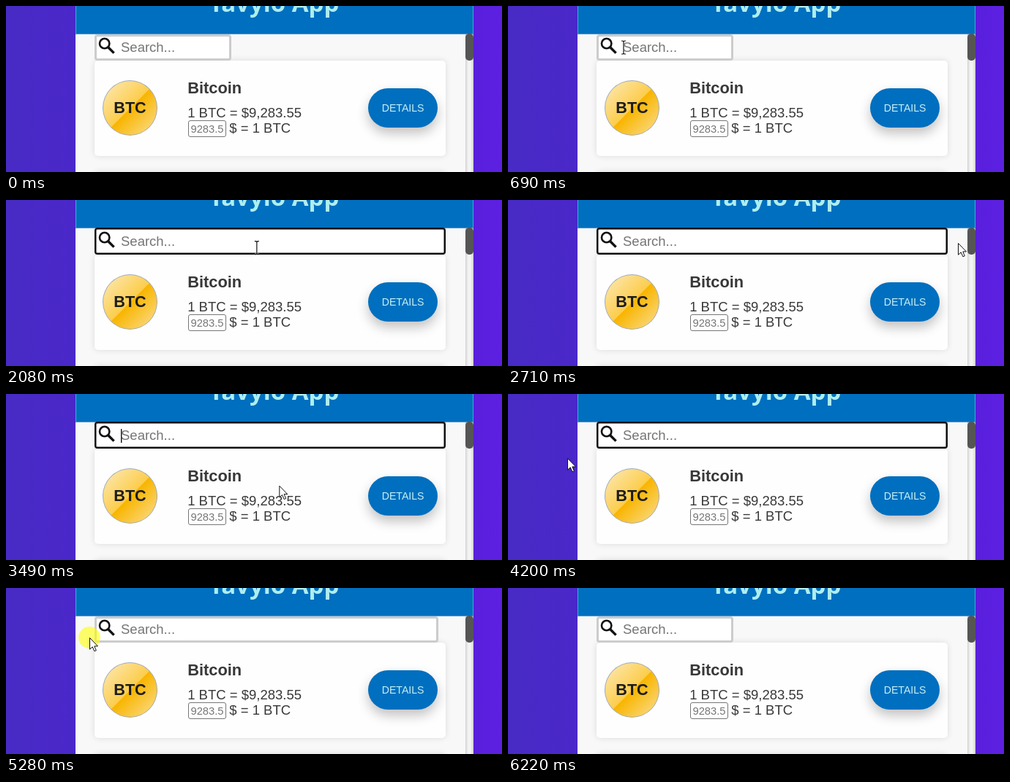
These frames come from a looping animation (678x228 px, 7.38 s). An HTML page:

```html
<!DOCTYPE html>
<html lang="en">
<head>
<meta charset="utf-8">
<title>Search field</title>
<style>
html, body { margin: 0; width: 100%; height: 100%; overflow: hidden; }
body { position: relative; background: linear-gradient(90deg, #482bc5, #4a27c9 14%, #581fdc 94%, #5d20e2); }
div, svg { position: absolute; box-sizing: border-box; }
svg { left: 0; top: 0; }
.app { left: 95px; top: 0; width: 544px; height: 228px; background: #f8f8f8; }
.header { left: 95px; top: 0; width: 544px; height: 39px; background: #006fbf; border: 0 solid #5a9fd8; border-width: 0 1px 1px; }
.track { left: 628px; top: 39px; width: 11px; height: 200px; background: #f5f5f5; box-shadow: inset 0 0 5px rgba(0,0,0,.3); }
.thumb { left: 628px; top: 38px; width: 11px; height: 37px; border-radius: 5px; background: #555; }
.card { left: 121px; width: 480px; height: 131px; border-radius: 5px; background: #fefefe; box-shadow: 0 0 8px rgba(0,0,0,.12); }
.coin { left: 132px; top: 102px; width: 75px; height: 76px; border-radius: 50%; border: 1px solid #a3abb5;
  background: linear-gradient(135deg, #fceabb, #fccd4d 50%, #f8b500 51%, #fbdf93); }
.button { left: 495px; top: 113px; width: 95px; height: 54px; border-radius: 27px; background: #006fbf; box-shadow: 0 8px 16px rgba(0,0,0,.24); }
.amount { left: 249px; top: 158px; width: 52px; height: 23px; border: 1px solid #767676; border-radius: 3px; background: #fff; }
#field { left: 121px; top: 39px; width: 187px; height: 36px; border: 3px solid #ccc; border-radius: 4px; background: #fff; }
#field.focus { top: 38px; height: 37px; border: 2px solid #101010; box-shadow: inset 0 0 0 .5px #101010; }
text { font-family: "Liberation Sans", Arial, sans-serif; font-size: 18.5px; fill: #383838; white-space: pre; }
.bold { font-weight: bold; }
.hint { fill: #757575; }
</style>
</head>
<body>
<div class="app"></div>
<div class="header"></div>
<div class="track"></div>
<div class="thumb"></div>
<div class="card" style="top:75px"></div>
<div class="card" style="top:228px"></div>
<div class="coin"></div>
<div class="button"></div>
<div class="amount" style="top:157px"></div>
<div id="field"></div>
<svg width="678" height="228" viewBox="0 0 678 228">
  <text x="366.5" y="8" text-anchor="middle" style="font:bold 33px 'Noto Sans','Open Sans',sans-serif;fill:#afeeee">Tavylo App</text>
  <g fill="none" stroke="#111">
    <circle cx="134.7" cy="51.5" r="6.7" stroke-width="2.6"/>
    <path d="M139.5 56.5L147.6 64.6" stroke-width="3.4"/>
  </g>
  <text class="hint" x="157" y="63">Search...</text>
  <text class="bold" x="169.5" y="147" text-anchor="middle" style="font-size:21.6px;fill:#1c1c1c">BTC</text>
  <text class="bold" x="248.3" y="119.6" style="font-size:21.8px">Bitcoin</text>
  <text x="248.2" y="152.7">1 BTC = $9,283.55</text>
  <text class="hint" x="252.5" y="173.8" style="font-size:14.7px">9283.5</text>
  <text x="305.3" y="174">$ = 1 BTC</text>
  <text x="542.6" y="145" text-anchor="middle" style="font-size:14.1px;fill:#c4f1f5">DETAILS</text>
  <rect id="caret" x="157" y="48" width="1.4" height="19" fill="#111"/>
  <circle id="halo" r="15" fill="#ff0" fill-opacity=".58"/>
  <path id="arrow" d="M.5 .5V16.2L4.2 12.8L6.9 18.8L9.3 17.8L6.8 11.9H11.5Z" fill="#fff" stroke="#111" stroke-linejoin="round"/>
  <g id="beam" fill="none">
    <path d="M-3 -9H-1L0 -8L1 -9H3M0 -8V8M-3 9H-1L0 8L1 9H3" stroke="#fff" stroke-width="2.4" stroke-opacity=".7"/>
    <path d="M-3 -9H-1L0 -8L1 -9H3M0 -8V8M-3 9H-1L0 8L1 9H3" stroke="#111" stroke-width="1.2"/>
  </g>
</svg>
<script>
const LOOP = 7380, STEP = LOOP / 95, LEAD = 12;
const NARROW = 187, WIDE = 480, GROW = 400;
const FOCUS = 1085, BLUR = 5262, BLINK = 530, FLASH = 240;
const ENTER = 70, LEAVE = 6200;

// pointer stops: time, x, y
const stops = [
  [70, 499, 210], [690, 158, 57], [1780, 158, 58], [2310, 589, 76], [2710, 615, 59],
  [3180, 611, 75], [3600, 330, 135], [4200, 81, 88], [4810, 114, 68], [5900, 114, 68], [6160, 660, 215]
];

const $ = id => document.getElementById(id);
const [field, caret, halo, arrow, beam] = ["field", "caret", "halo", "arrow", "beam"].map($);
const show = (el, on) => { el.style.visibility = on ? "visible" : "hidden"; };
const within = (t, a, b) => t >= a && t < b;
const clamp = x => Math.min(1, Math.max(0, x));
const smooth = x => x * x * (3 - 2 * x);
const mix = (a, b, k) => a + (b - a) * k;

// CSS "ease", solved by bisection
function ease(x) {
  const bez = (a, b, s) => 3 * a * s * (1 - s) ** 2 + 3 * b * s * s * (1 - s) + s ** 3;
  let lo = 0, hi = 1;
  for (let i = 0; i < 24; i++) {
    const mid = (lo + hi) / 2;
    if (bez(.25, .25, mid) < x) lo = mid; else hi = mid;
  }
  return bez(.1, 1, lo);
}

function pointerAt(t) {
  const next = stops.findIndex(s => s[0] > t);
  const i = next < 0 ? stops.length - 1 : Math.max(1, next);
  const [t0, x0, y0] = stops[i - 1], [t1, x1, y1] = stops[i];
  const k = smooth(clamp((t - t0) / (t1 - t0)));
  return [mix(x0, x1, k), mix(y0, y1, k)];
}

function draw(time) {
  // the screen refreshes at a fixed, low rate
  const t = Math.floor((time + LEAD) / STEP) * STEP;
  const focused = within(t, FOCUS, BLUR);
  const grown = ease(clamp((t - FOCUS - 20) / GROW)) - ease(clamp((t - BLUR) / GROW));
  const width = mix(NARROW, WIDE, grown);
  field.className = focused ? "focus" : "";
  field.style.width = width + "px";
  show(caret, focused && Math.floor((t - FOCUS) / BLINK) % 2 === 0);

  const [x, y] = pointerAt(t);
  const visible = within(t, ENTER, LEAVE);
  const overField = within(x, 121, 121 + width) && within(y, 39, 75);
  for (const el of [arrow, beam, halo]) el.setAttribute("transform", `translate(${x} ${y})`);
  show(beam, visible && overField);
  show(arrow, visible && !overField);
  show(halo, [FOCUS, BLUR].some(click => within(t, click, click + FLASH)));
}

const start = performance.now();
function tick() {
  draw((performance.now() - start) % LOOP);
  requestAnimationFrame(tick);
}
tick();
</script>
</body>
</html>
```
